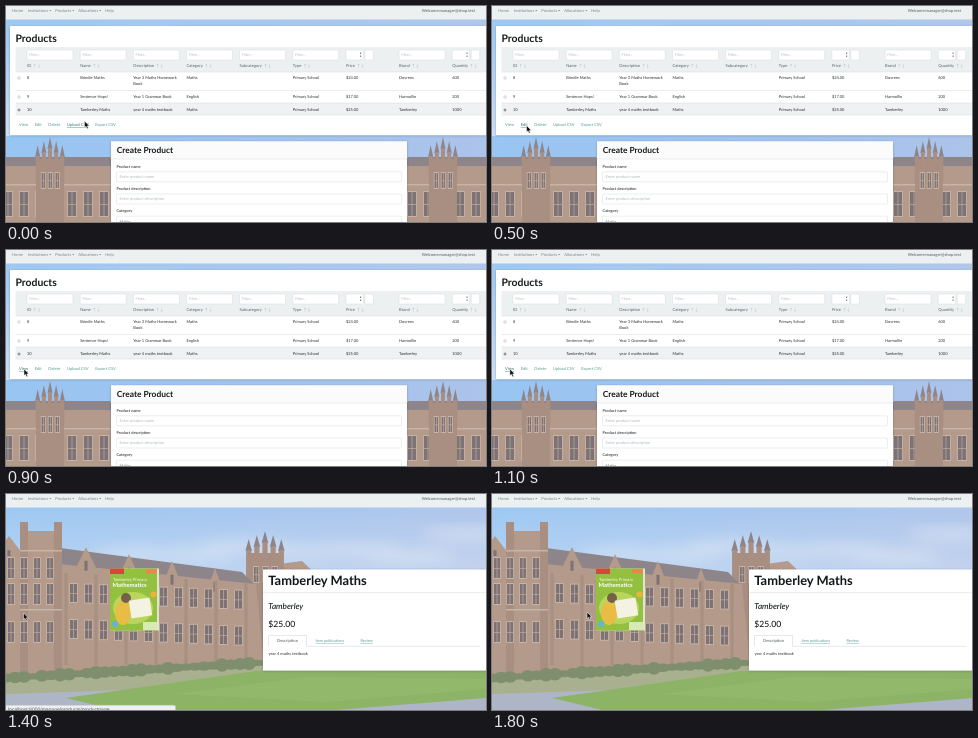
Recreate the animation shown at these times as an HTML page. Size 480x216 px, loop 1.9 s.

```html
<!DOCTYPE html>
<html lang="en">
<head>
<meta charset="utf-8">
<title>Product admin</title>
<style>
html, body { margin: 0; width: 100%; height: 100%; overflow: hidden; background: #a9c6ea; }
svg { display: block; width: 480px; height: 216px; overflow: hidden; }
text { font-family: Lato, sans-serif; text-rendering: geometricPrecision; white-space: pre; }
.status text { font-family: "Liberation Sans", Arial, sans-serif; }
</style>
</head>
<body>
<svg id="stage" viewBox="0 0 480 216" xmlns="http://www.w3.org/2000/svg">
  <defs>
    <linearGradient id="sky">
      <stop offset="0" stop-color="#98c5f2"/><stop offset="1" stop-color="#acc3ea"/>
    </linearGradient>
    <linearGradient id="fade" x2="0" y2="1">
      <stop offset="0" stop-color="#eef0f4" stop-opacity="0"/><stop offset="1" stop-color="#eef0f4" stop-opacity=".6"/>
    </linearGradient>
    <filter id="soft"><feGaussianBlur stdDeviation=".5"/></filter>
    <filter id="haze"><feGaussianBlur stdDeviation="7"/></filter>
    <filter id="shade" x="-5%" y="-5%" width="110%" height="115%">
      <feDropShadow dx="0" dy=".6" stdDeviation="1" flood-color="#2c3e50" flood-opacity=".35"/>
    </filter>
  </defs>
</svg>
<script>
const NS = 'http://www.w3.org/2000/svg';
const stage = document.getElementById('stage');
const INK = '#2b3033', GREY = '#7d898c', PALE = '#b3babd', LINK = '#5c9c93', HOVER = '#3c7972';
const LINE = '#d6dadc', BAND = '#ecf0f1';
const WALL = '#b39a8b', TOWER = '#a88f82', ROOF = '#8d8589', TRIM = '#c8b4a4', GLASS = '#7d7377';
const bold = { 'font-weight': 700 };

function add(parent, tag, attrs = {}) {
  const el = document.createElementNS(NS, tag);
  for (const k in attrs) el.setAttribute(k, attrs[k]);
  parent.append(el);
  return el;
}
const group = (p, attrs) => add(p, 'g', attrs);
const rect = (p, x, y, width, height, fill, more) => add(p, 'rect', { x, y, width, height, fill, ...more });
const poly = (p, points, fill, more) => add(p, 'polygon', { points, fill, ...more });
const oval = (p, cx, cy, rx, ry, fill, more) => add(p, 'ellipse', { cx, cy, rx, ry, fill, ...more });
function text(p, x, y, str, size = 4, fill = INK, more) {
  const el = add(p, 'text', { x, y, 'font-size': size, fill, ...more });
  el.textContent = str;
  return el;
}
const field = (p, x, y, w, h) => rect(p, x, y, w, h, '#fff', { rx: 1, stroke: LINE, 'stroke-width': .5 });
const card = (p, x, y, w, h) => rect(p, x, y, w, h, '#fff', { filter: 'url(#shade)' });
const rule = (p, x, y, w) => rect(p, x, y - .25, w, .5, LINE);

let seed = 7;
const random = () => (seed = seed * 16807 % 2147483647) / 2147483647;

// Photo backdrop
function drawSky(p) {
  rect(p, 0, 0, 480, 216, 'url(#sky)');
  rect(p, 0, 0, 480, 130, 'url(#fade)');
  const clouds = group(p, { opacity: .4, filter: 'url(#haze)' });
  for (let i = 0; i < 7; i++) oval(clouds, 130 + i * 55, 30 + random() * 40, 45, 7, '#eef1f7');
}

function windows(p, x0, x1, step, top, slope, w, h) {
  for (let x = x0; x < x1; x += step) {
    const y = top + (x - x0) * slope;
    rect(p, x - .8, y - 1, w + 1.6, h + 2, TRIM);
    rect(p, x, y, w, h, GLASS);
    rect(p, x + w / 2 - .3, y, .6, h, TRIM);
    rect(p, x, y + h / 2, w, .6, TRIM);
  }
}

function gable(p, x, y, w, h) {
  poly(p, `${x - w},${y + h} ${x},${y} ${x + w},${y + h}`, WALL);
  rect(p, x - 1.5, y + h * .55, 3, h * .4, GLASS);
}

// Square tower with pinnacles, the middle one tallest
function pinnacles(p, x, top, w, base) {
  rect(p, x - w / 2, top + 22, w, base - top - 22, TOWER);
  for (let i = -2; i <= 2; i++) {
    const cx = x + i * w * .22, y = top + Math.abs(i) * 4;
    poly(p, `${cx},${y} ${cx + w * .09},${y + 12} ${cx - w * .09},${y + 12}`, ROOF);
    rect(p, cx - w * .07, y + 11, w * .14, 26, TOWER);
  }
  windows(p, x - w * .3, x + w * .35, w * .25, top + 36, 0, w * .12, 15);
}

function drawQuad(p) {
  drawSky(p);
  const b = group(p, { filter: 'url(#soft)' });
  rect(b, 240, 85, 140, 90, TOWER);
  poly(b, '274,70 296,67 320,90 274,90', WALL);
  pinnacles(b, 259, 37, 37, 110);

  poly(b, '54,54 236,78 250,92 54,76', ROOF);
  poly(b, '54,70 250,90 258,172 54,186', WALL);
  for (let i = 0; i < 4; i++) gable(b, 80 + i * 43, 53 + i * 7, 12 - i, 25);
  for (const y of [90, 126]) windows(b, 64, 240, 15, y, .04, 7, 18);
  for (let x = 60; x < 250; x += 30) rect(b, x - 1.5, 76 + x * .05, 3, 95 - x * .05, TOWER);

  gable(b, 3, 42, 20, 26);
  rect(b, 0, 62, 18, 130, WALL);
  rect(b, 18, 37, 36, 148, WALL);
  for (const x of [14, 48]) rect(b, x, 28, 8, 157, TOWER);
  for (const y of [56, 115]) rect(b, 14, y, 42, 1.5, TRIM);
  for (const y of [64, 90, 128]) windows(b, 2, 46, 13, y, 0, 6, 20);

  rect(b, 0, 190, 480, 26, '#adb5c6');
  poly(b, '0,184 258,168 480,168 480,184 0,200', '#a9b08f');
  for (let x = 0; x < 260; x += 9) oval(b, x, 184 - x * .06, 7, 3 + random() * 4, '#7f8f6d');
  poly(b, '60,204 250,177 480,177 480,204 330,216 110,216', '#8db366');
  poly(b, '170,200 300,183 480,185 480,195 320,208', '#97bd6e', { opacity: .6 });
}

function hall(p, x0, x1, towerX) {
  poly(p, `${x0},162 ${x0 + 6},151 ${x1 - 6},151 ${x1},162`, ROOF);
  rect(p, x0, 160, x1 - x0, 60, WALL);
  rect(p, x0, 178, x1 - x0, 1.5, TRIM);
  windows(p, x0 + 6, x1 - 6, 16, 186, 0, 8, 24);
  pinnacles(p, towerX, 131, 28, 216);
}

function drawRoofs(p) {
  drawSky(p);
  const b = group(p, { filter: 'url(#soft)' });
  hall(b, -8, 110, 44);
  hall(b, 396, 488, 437);
}

// Lays labels out in a row and returns their extents
function flow(p, x, y, labels, gap, fill) {
  return labels.map(label => {
    const menu = label.endsWith('▾');
    const el = text(p, x, y, label.replace('▾', ''), 4.1, fill);
    const w = el.getComputedTextLength();
    const item = { el, x, w };
    if (menu) poly(p, `${x + w + 1},${y - 2.2} ${x + w + 3.2},${y - 2.2} ${x + w + 2.1},${y - .9}`, GREY);
    x += w + gap + (menu ? 2.2 : 0);
    return item;
  });
}

function drawNav(p) {
  rect(p, 0, 0, 480, 13.5, BAND);
  flow(p, 6, 6.2, ['Home', 'Institutions▾', 'Products▾', 'Allocations▾', 'Help'], 4.9, GREY);
  text(p, 469, 6.2, 'Welcome:manager@shop.test', 4.1, '#555d60', { 'text-anchor': 'end' });
}

const heads = ['ID', 'Name', 'Description', 'Category', 'Subcategory', 'Type', 'Price', 'Brand', 'Quantity'];
const rows = [
  [73, '8', 'Brindle Maths', 'Year 3 Maths Homework', 'Maths', '', 'Primary School', '$24.00', 'Dovrens', '600'],
  [92, '9', 'Sentence Hops!', 'Year 1 Grammar Book', 'English', '', 'Primary School', '$17.00', 'Harmollin', '200'],
  [105, '10', 'Tamberley Maths', 'year 4 maths textbook', 'Maths', '', 'Primary School', '$25.00', 'Tamberley', '1000']
];

function drawList(p) {
  card(p, 4, 20, 480, 109);
  text(p, 9.5, 36.2, 'Products', 10.4, '#15191b', bold);
  rect(p, 9.5, 41, 471, 25, BAND);
  rect(p, 9.5, 97, 471, 12, '#eff1f2');
  for (const y of [66, 84.5, 97, 109]) rule(p, 9.5, y, 471);
  heads.forEach((label, i) => {
    const x = 21 + i * 53.15;
    if (label === 'Price' || label === 'Quantity') {
      field(p, x, 44, 17.5, 10);
      field(p, x + 19, 44, 8.5, 10);
      for (const y of [46.5, 49.5]) rect(p, x + 14.5, y, .7, 1.5, INK);
    } else {
      field(p, x, 44, 46, 10);
      text(p, x + 2.3, 50.4, 'Filter...', 3.7, PALE);
    }
    const head = text(p, x, 60.5, label, 4.1, '#5c6568');
    add(head, 'tspan', { fill: PALE, dx: 2 }).textContent = '↑ ↓';
    for (const row of rows) text(p, x, row[0], row[i + 1]);
  });
  text(p, 127.3, 79.2, 'Book');
  for (const [y, id] of rows)
    oval(p, 13, y - 1, 1.25, 1.25, id === '10' ? '#838d91' : '#fff', { stroke: '#a4abad', 'stroke-width': .5 });
  return flow(p, 13, 120.3, ['View', 'Edit', 'Delete', 'Upload CSV', 'Export CSV'], 6.6, LINK);
}

function drawForm(p) {
  card(p, 105, 135.5, 296, 90);
  rect(p, 105, 135.5, 296, 17.5, '#fbfbfb');
  text(p, 110.7, 147, 'Create Product', 8.4, '#15191b', bold);
  rule(p, 105, 153, 296);
  ['Product name', 'Product description', 'Category'].forEach((label, i) => {
    const y = 162 + i * 22.2, last = label === 'Category';
    text(p, 110.5, y, label, 3.95, INK, { 'font-weight': 500 });
    field(p, 110.5, y + 3.8, 285, 10);
    text(p, 113.5, y + 10.2, last ? 'Maths' : 'Enter ' + label.toLowerCase(), 4, last ? GREY : PALE);
  });
}

function drawBook(p) {
  rect(p, 104, 74.5, 49, 62, '#dfe6cf');
  rect(p, 104, 74.5, 47, 62, '#93c13f');
  rect(p, 104, 74.5, 14, 5.5, '#d8453c');
  rect(p, 140, 75, 11, 4.5, '#e58a4b');
  text(p, 107, 87, 'Tamberley Primary', 4.2, '#f5fae9');
  text(p, 106.5, 93, 'Mathematics', 5.9, '#fff', bold);
  oval(p, 127, 114, 20, 16, '#b9d55c');
  oval(p, 117, 119, 8, 12, '#e9bd45');
  oval(p, 120, 104, 5, 5, '#76604a');
  rect(p, 124, 105, 21, 18, '#f4f2e2', { transform: 'rotate(-9 134 114)' });
  oval(p, 147.5, 100.5, 3, 3, '#edb23c');
  oval(p, 109, 130, 3.2, 3.2, '#68b5c8');
  rect(p, 137, 128, 14, 8, '#d9e9b4');
}

function drawDetail(p) {
  drawBook(p);
  card(p, 257, 75.5, 230, 101);
  text(p, 262.3, 91, 'Tamberley Maths', 12.9, '#111517', bold);
  rule(p, 257, 98.8, 223);
  text(p, 262.3, 114.5, 'Tamberley', 8.2, '#15191b', { 'font-style': 'italic', 'font-weight': 500 });
  text(p, 262.3, 133, '$25.00', 8.6, '#15191b', { 'font-weight': 500 });
  add(p, 'path', { d: 'M262.5 152.3V141.5H300.5V152.3H474.5', fill: 'none', stroke: LINE, 'stroke-width': .6 });
  text(p, 281.5, 148.3, 'Description', 4.1, '#555d60', { 'text-anchor': 'middle' });
  text(p, 309.5, 148.3, 'Item publications', 3.8, LINK, { 'text-decoration': 'underline' });
  text(p, 354.5, 148.3, 'Review', 3.9, LINK, { 'text-decoration': 'underline' });
  text(p, 262.5, 161, 'year 4 maths textbook');
}

const listPage = group(stage);
drawRoofs(listPage);
const links = drawList(listPage);
drawForm(listPage);

const detailPage = group(stage);
drawQuad(detailPage);
drawDetail(detailPage);

drawNav(group(stage));

const status = group(stage, { class: 'status' });
rect(status, -2, 211.3, 171.5, 10, '#eef0f1', { rx: 1.5, stroke: '#c3c7c9', 'stroke-width': .5 });
const statusText = text(status, 2, 217, '', 5, '#555b5e');

const cursor = group(stage);
poly(cursor, '0,0 0,6.6 1.5,5.3 2.6,7.7 3.8,7.2 2.8,4.9 4.8,4.8', '#111', { stroke: '#fff', 'stroke-width': .5 });

const STEP = 100, LOOP = 1900, OPEN = 1400;
// Pointer stops: time, x, y
const stops = [[0, 78.5, 115], [200, 70, 103], [500, 34.5, 119.5], [900, 18, 119], [OPEN, 17.5, 119], [1800, 95, 118], [LOOP, 95, 118]];

function pointer(t) {
  const i = stops.findIndex(s => s[0] > t);
  const [t0, x0, y0] = stops[i - 1], [t1, x1, y1] = stops[i];
  const f = (t - t0) / (t1 - t0), e = f * f * (3 - 2 * f);
  return [x0 + (x1 - x0) * e, y0 + (y1 - y0) * e];
}

function draw(t) {
  const [x, y] = pointer(t), opened = t >= OPEN;
  cursor.setAttribute('transform', `translate(${x} ${y})`);
  for (const link of links) {
    const over = y > 114.5 && x >= link.x && x <= link.x + link.w;
    link.el.setAttribute('fill', over ? HOVER : LINK);
    link.el.setAttribute('text-decoration', over ? 'underline' : 'none');
  }
  listPage.style.display = opened ? 'none' : '';
  detailPage.style.display = opened ? '' : 'none';
  status.style.display = t >= 1300 && t < 1600 ? '' : 'none';
  statusText.textContent = opened ? 'localhost:8000/manage/products/productpage' : 'Waiting for localhost...';
}

function tick() {
  draw(Math.floor(performance.now() % LOOP / STEP) * STEP);
  requestAnimationFrame(tick);
}
tick();
</script>
</body>
</html>
```
